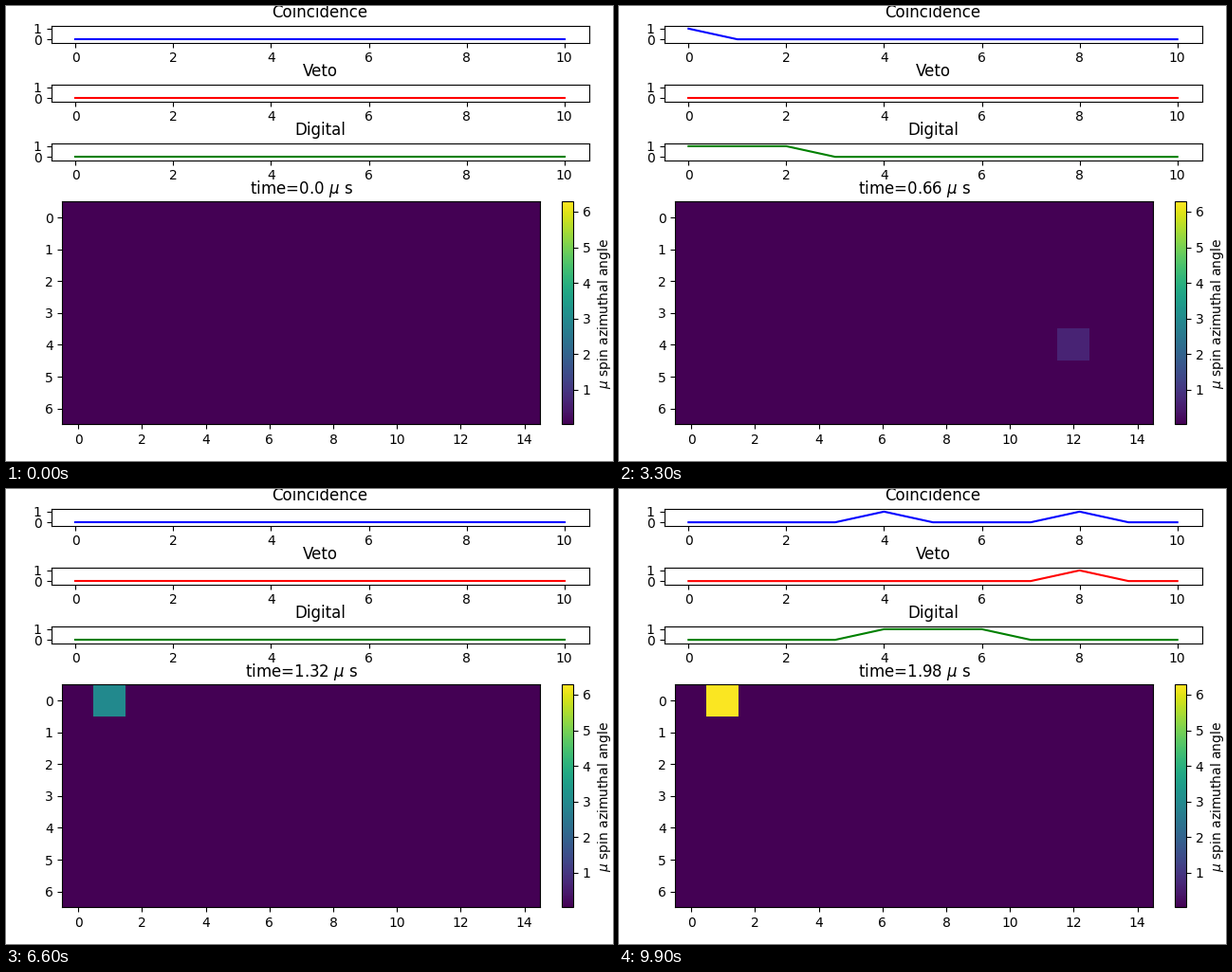
Write a matplotlib script that moves like this. It is 640 px wide and 480 px high and loops after 10 s.

```python
import numpy as np
import matplotlib.pyplot as plt
from matplotlib.animation import FuncAnimation

W, H = 640, 480
FRAMES, INTERVAL = 100, 100
DT = 0.02            # microseconds per step
OMEGA = 4.6          # spin precession, rad per microsecond
WINDOW = 11          # samples visible in each trace

# step at which a muon lands, its cell (row, column) and starting angle
MUONS = [(23, (4, 12), 1.58), (38, (0, 1), 5.572)]


def pulses(*steps):
    signal = np.zeros(FRAMES + WINDOW - 1)
    signal[np.array(steps) + WINDOW - 1] = 1
    return signal


def gate(*starts, length=3):
    return pulses(*[s + k for s in starts for k in range(length)])


TRACES = [
    ("Coincidence", "b", pulses(23, 38, 93, 97)),
    ("Veto", "r", pulses(41, 97)),
    ("Digital", "g", gate(23, 38, 93)),
]

plt.rcParams["font.family"] = "DejaVu Sans"
fig = plt.figure(figsize=(W / 100, H / 100), dpi=100)


def pixel_axes(left, top, right, bottom):
    return fig.add_axes([left / W, 1 - bottom / H,
                         (right - left) / W, (bottom - top) / H])


lines = []
for k, (name, color, signal) in enumerate(TRACES):
    ax = pixel_axes(47.5, 20.5 + 62 * k, 614.5, 38.5 + 62 * k)
    ax.set(xlim=(-0.5, 10.5), ylim=(-0.3, 1.3), yticks=[0, 1])
    ax.set_title(name)
    lines += ax.plot(np.arange(WINDOW), signal[:WINDOW], color)

grid_ax = pixel_axes(59.4, 206.4, 563.4, 441.4)
image = grid_ax.imshow(np.zeros((7, 15)), vmin=0.03, vmax=6.28,
                       cmap="viridis", aspect="auto")
title = grid_ax.set_title("")
bar = fig.colorbar(image, cax=pixel_axes(586.2, 206.4, 597.9, 441.4))
bar.set_label(r"$\mu$ spin azimuthal angle")


def spin_map(step):
    cells = np.zeros((7, 15))
    landed = [m for m in MUONS if m[0] <= step]
    if landed:
        start, cell, angle = landed[-1]
        cells[cell] = (angle - OMEGA * DT * (step - start)) % (2 * np.pi)
    return cells


def update(step):
    for line, (_, _, signal) in zip(lines, TRACES):
        line.set_ydata(signal[step:step + WINDOW])
    image.set_data(spin_map(step))
    title.set_text(rf"time={round(step * DT, 2)} $\mu$ s")
    return [*lines, image, title]


anim = FuncAnimation(fig, update, frames=FRAMES, interval=INTERVAL,
                     repeat=True, repeat_delay=0)
plt.show()
```
